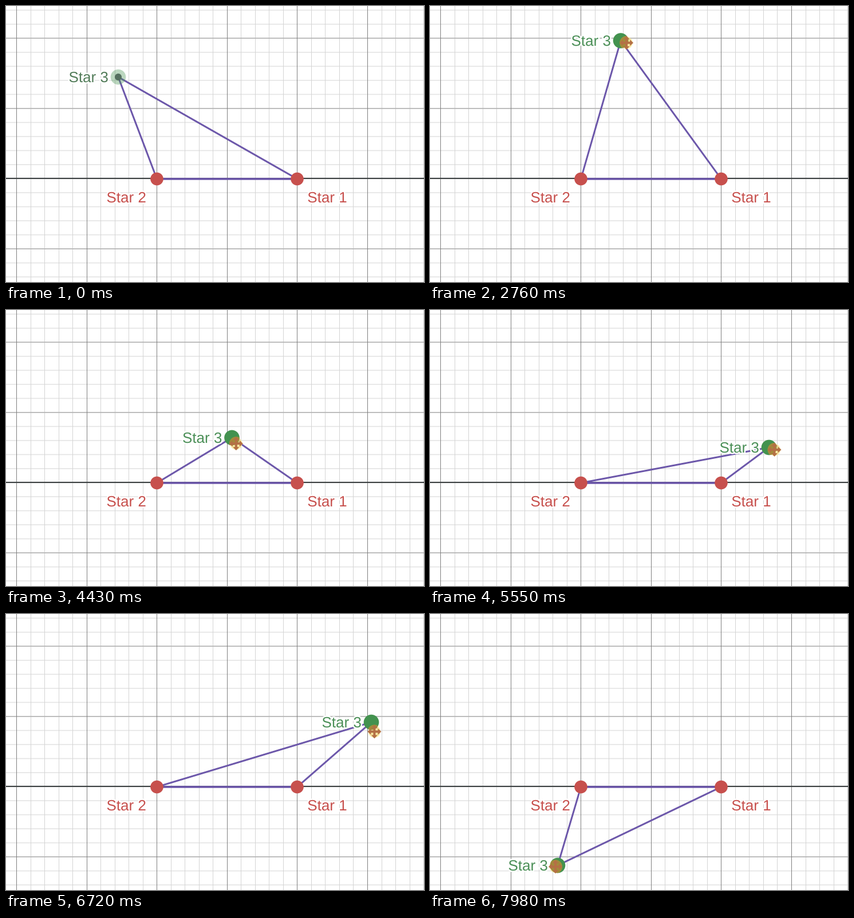
A matplotlib script that plays this animation: 730 by 482 pixels, repeating every 8 s.

```python
import numpy as np
import matplotlib.pyplot as plt
from matplotlib.animation import FuncAnimation
from matplotlib.collections import LineCollection
from matplotlib.patches import Circle, Polygon
from matplotlib.patheffects import withStroke

plt.rcParams["text.hinting"] = "no_hinting"

W, H, DPI = 730, 482, 64
PX = 72 / DPI                      # one pixel in points
LOOP, DT = 8000, 20

RED, GREEN, DIM_GREEN = "#c7504d", "#43924f", "#527c59"
PURPLE = "#6c57aa"
STAR1, STAR2 = (508.5, 302), (263.5, 302)

# turning points of the drag: time, x, y
PATH = np.array([
    (1660, 196, 124), (1990, 206, 118), (2480, 299, 84), (3430, 384, 18),
    (3590, 385, 26), (4150, 391, 178), (4430, 394.5, 223), (4990, 482, 259),
    (5550, 592, 240), (6270, 640, 78), (6720, 638, 189), (7490, 523, 408),
    (7760, 370, 458), (7980, 223, 439), (8060, 207, 430)])

# the pointer runs ahead of the dragged star
LEAD, GRIP = 35, np.array([6, 7])

# times at which the 70 ms stepping restarts
STEP_STARTS = (130, 1720, 1990, 3590, 6720)


def follow(t):
    """Monotone cubic along PATH, at rest at both ends."""
    times, pts = PATH[:, 0], PATH[:, 1:]
    t = np.clip(t, times[0], times[-1])
    rates = np.diff(pts, axis=0) / np.diff(times)[:, None]
    a, b = rates[:-1], rates[1:]
    same = a * b > 0
    slopes = np.zeros_like(pts)
    slopes[1:-1][same] = 2 * a[same] * b[same] / (a[same] + b[same])
    i = min(np.searchsorted(times, t, "right"), len(times) - 1) - 1
    h = times[i + 1] - times[i]
    u = (t - times[i]) / h
    v = 1 - u
    return (v * v * ((1 + 2 * u) * pts[i] + u * h * slopes[i])
            + u * u * ((1 + 2 * v) * pts[i + 1] - v * h * slopes[i + 1]))


def glide(t, t0, t1, start, end):
    u = np.clip((t - t0) / (t1 - t0), 0, 1)
    return np.add(start, np.subtract(end, start) * u * u * (3 - 2 * u))


def pointer(t):
    if t < 935:
        return glide(t, 130, 900, (592, 390), (170, 137))
    if t < 1660:
        return glide(t, 935, 1460, (170, 137), PATH[0, 1:] + GRIP)
    return follow(t + LEAD) + GRIP


def stepped(t):
    start = max((s for s in STEP_STARTS if s <= t), default=t)
    return start + (t - start) // 70 * 70


fig = plt.figure(figsize=(W / DPI, H / DPI), dpi=DPI, facecolor="white")
ax = fig.add_axes((0, 0, 1, 1))
ax.set(xlim=(0, W), ylim=(H, 0))
ax.axis("off")


def add_lines(segs, color, width):
    ax.add_collection(LineCollection(segs, colors=color, linewidths=width * PX,
                                     snap=False, zorder=1))


def add_grid(step, upright, level):
    """Crisp upright lines and softer, wider level ones."""
    xs = np.floor(np.arange(18.5, W, step)) + 0.5
    ys = np.arange(301.5 % step, H, step)
    add_lines([[(0, y), (W, y)] for y in ys], level, 1.6)
    add_lines([[(x, 0), (x, H)] for x in xs], upright, 1)


def disc(center, r, color, z, alpha=1.0):
    return ax.add_patch(Circle(center, r, facecolor=color, edgecolor="none",
                               alpha=alpha, zorder=z))


def label(x, y, text, color):
    return ax.text(x, y, text, color=color, family="Liberation Sans",
                   fontsize=26 * PX, va="baseline", zorder=5,
                   path_effects=[withStroke(linewidth=5 * PX, foreground="white")])


add_grid(24.52, "#d4d4d4", "#e4e4e4")
add_grid(122.6, "#808080", "#b2b2b2")
ax.plot([0, W], [301, 301], color="#3b4041", lw=2 * PX, zorder=2)

ax.plot(*zip(STAR2, STAR1), color=PURPLE, lw=3.6 * PX, zorder=3)
sides, = ax.plot([], [], color=PURPLE, lw=3 * PX, zorder=3,
                 solid_joinstyle="round")
for star in (STAR1, STAR2):
    disc(star, 11.3, RED, 4)
label(526.3, 343, "Star 1", RED)
label(175.5, 343, "Star 2", RED)

name = label(0, 0, "Star 3", GREEN)
glow = disc((0, 0), 10.5, "#f8e58c", 5.5, 0.8)
big = disc((0, 0), 13.3, GREEN, 6)
core = disc((0, 0), 6, "#55705f", 7)
tint = disc((0, 0), 12, "#ac8c38", 7, 0.9)

ARM = np.array([(-2, -2), (-2, -6), (-5.5, -6), (0, -12), (5.5, -6), (2, -6)])
CROSS = np.vstack([ARM @ np.array([(c, s), (-s, c)])
                   for c, s in ((1, 0), (0, 1), (-1, 0), (0, -1))])
ARROW = np.array([(0, 0), (0, 15), (3.5, 12), (6, 17.5), (8.3, 16.5),
                  (6, 11), (10.5, 11)])
cross = ax.add_patch(Polygon(CROSS, facecolor="#b47045", edgecolor="none",
                             zorder=8))
arrow = ax.add_patch(Polygon(ARROW, facecolor="white", edgecolor="#333333",
                             lw=PX, zorder=8))


def draw(i):
    t = stepped(i * DT + DT // 2)
    star, tip = follow(t), pointer(t)
    x, y = star
    shown, held = t >= 130, t >= 1250

    sides.set_data([STAR2[0], x, STAR1[0]], [STAR2[1], y, STAR1[1]])
    name.set_position((x - 86.5, y + 9))
    name.set_color("#4b8f57" if held else DIM_GREEN)

    big.center = core.center = star
    big.set_alpha(1 if held else 0.36)
    core.set_visible(not held)

    glow.center = tint.center = tip
    glow.set_visible(shown)
    tint.set_visible(held)
    tint.set_clip_path(big)
    cross.set_xy(CROSS + tip)
    cross.set_visible(held)
    arrow.set_xy(ARROW + tip)
    arrow.set_visible(shown and not held)
    return sides, name, big, core, glow, tint, cross, arrow


anim = FuncAnimation(fig, draw, frames=LOOP // DT, interval=DT,
                     repeat=True, repeat_delay=0, blit=False)
plt.show()
```
